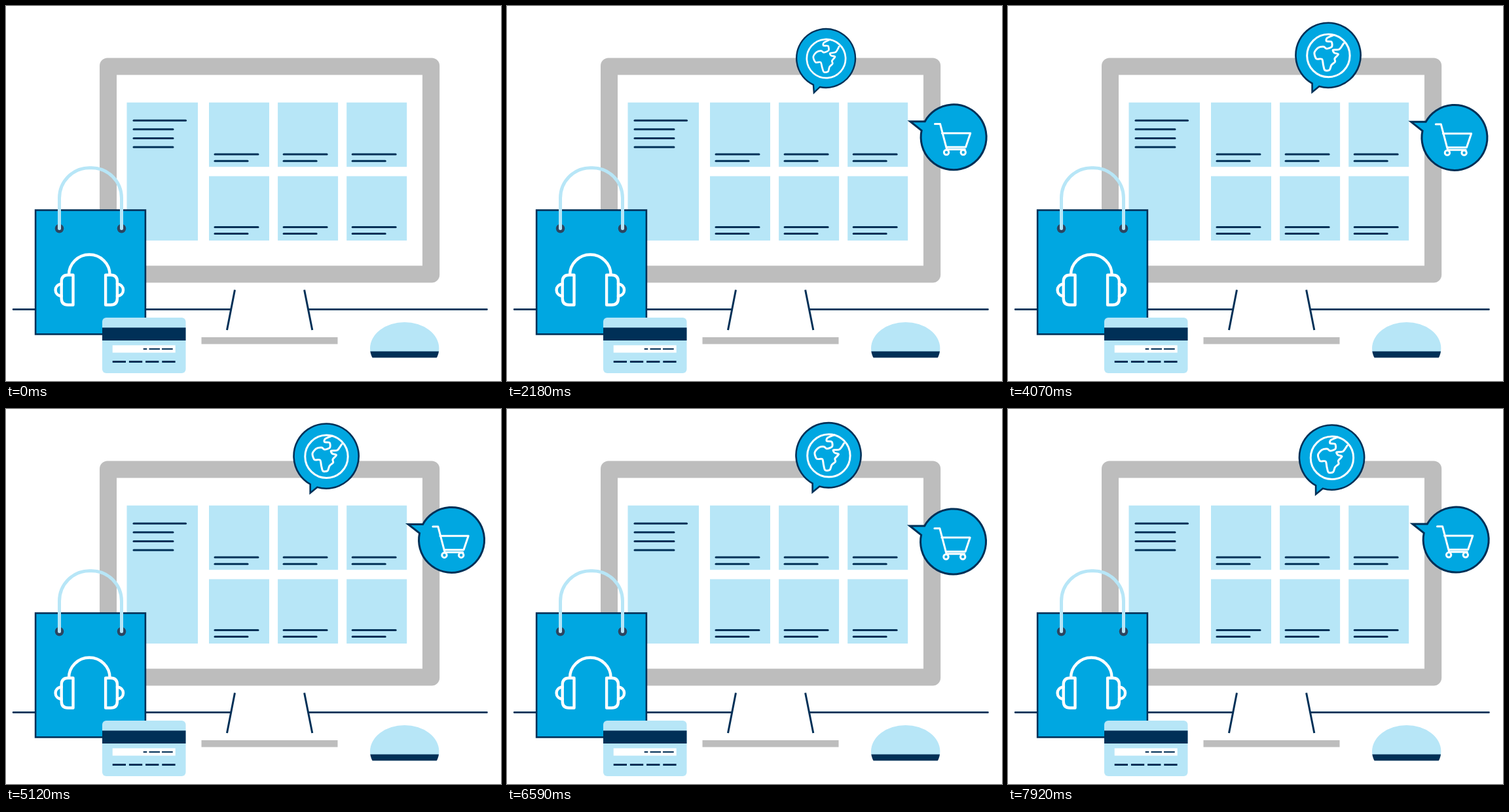
An HTML page for the animation above (7990 ms loop, 756 by 574 pixels).

```html
<!DOCTYPE html>
<html lang="en">
<head>
<meta charset="utf-8">
<title>Online shopping</title>
<style>
  html, body { margin: 0; width: 100%; height: 100%; overflow: hidden; background: #fff; }
  svg { display: block; width: 100%; height: 100%; }
  .gray { fill: #bdbdbd; }
  .light { fill: #b7e6f7; }
  .navy { fill: #003057; }
  .white { fill: #fff; }
  .blue { fill: #00a7e1; stroke: #003057; stroke-width: 2.6; }
  .ink { fill: none; stroke: #003057; stroke-width: 3; }
  .icon { fill: none; stroke: #fff; stroke-width: 3; stroke-linecap: round; stroke-linejoin: round; }
  .round { stroke-linecap: round; }
  .thin { stroke-width: 2.6; }
  .bold { stroke-width: 4.4; }
</style>
</head>
<body>
<svg viewBox="0 0 756 574">
  <defs>
    <clipPath id="dome"><ellipse cx="608.7" cy="524" rx="52.7" ry="40"/></clipPath>
    <g id="cup">
      <path d="M102.5 411.7H94.5Q84.7 411.7 84.7 422V447.5Q84.7 457.5 94.5 457.5H102.5Z"/>
      <path d="M84.7 425.5C72.5 427 72.5 442.5 84.7 444"/>
    </g>
  </defs>

  <!-- desk and monitor -->
  <path class="ink round thin" d="M11 464.4H343M462.5 464.4H734.5"/>
  <rect class="gray" x="143" y="79.5" width="519.2" height="344" rx="12"/>
  <rect class="white" x="169" y="105.5" width="467" height="292"/>
  <rect class="light" x="184.5" y="147.7" width="108.5" height="211.3"/>
  <g id="page"></g>
  <path class="ink" d="M349.5 434.5L337.5 496M455.6 434.5L467.8 496"/>
  <rect class="gray" x="298.5" y="507" width="208" height="10.5"/>

  <!-- mouse -->
  <g clip-path="url(#dome)">
    <rect class="light" x="550" y="480" width="118" height="50"/>
    <rect class="navy" x="550" y="528.6" width="118" height="9.7"/>
  </g>

  <!-- bag -->
  <rect class="blue" x="45.1" y="312.5" width="167.8" height="189.9"/>
  <g fill="#2c4560">
    <circle cx="81.5" cy="340.6" r="6.8"/>
    <circle cx="176.5" cy="340.6" r="6.8"/>
  </g>
  <path class="round" fill="none" stroke="#b7e6f7" stroke-width="5"
    d="M81.5 340.5V294A46 46.3 0 0 1 127.5 247.7H130.5A46 46.3 0 0 1 176.5 294V340.5"/>
  <g class="icon bold">
    <path d="M96 411.5A31.3 31 0 0 1 158.6 411.5"/>
    <use href="#cup"/>
    <use href="#cup" transform="translate(254.6 0) scale(-1 1)"/>
  </g>

  <!-- payment card -->
  <rect class="light" x="147" y="477" width="127.5" height="85" rx="6"/>
  <rect class="navy" x="147" y="492.3" width="127.5" height="19.7"/>
  <rect class="white" x="162.7" y="519.3" width="96" height="11.3"/>
  <path class="ink" style="stroke-width:2" d="M209.7 525H215.3M218.5 525H235M238 525H254.7"/>
  <path class="ink" d="M162.7 544.5H258.7" stroke-dasharray="20.3 4.9"/>

  <!-- speech bubbles, each centred on 0,0 -->
  <g id="globe">
    <path class="blue" d="M-24.4 43.2A49.6 49.6 0 1 1 -13.7 47.7L-24.4 56.5Z"/>
    <g class="icon">
      <circle cx=".4" cy=".7" r="32.7"/>
      <path id="land"/>
    </g>
  </g>
  <g id="cart">
    <path class="blue" style="stroke-width:3" d="M-43.5-25.6A50 50 0 1 1 -48.6-11.8L-66-25.6Z"/>
    <g class="icon">
      <path d="M-28.3-21.9H-20.3L-11 13.6H18.8L26-7.7H-17.3M-11 13.6L-10 17.2H17.5"/>
      <circle cx="-10.7" cy="21.7" r="3.7"/>
      <circle cx="15" cy="21.7" r="3.7"/>
    </g>
  </g>
</svg>
<script>
const LOOP = 7990, STEP = 70, FIRST = 1060, POP = 950;
const $ = id => document.getElementById(id);

// web page on the screen
const line = (x, y, w) => `<path class="ink round" d="M${x} ${y}h${w}"/>`;
let page = "";
for (let i = 0; i < 4; i++) page += line(195, 175.3 + 13.57 * i, i ? 60 : 79.5);
for (let row = 0; row < 2; row++) {
  for (let col = 0; col < 3; col++) {
    const x = 310 + 105.1 * col, y = 227.1 + 111.3 * row;
    page += `<rect class="light" x="${x}" y="${147.7 + 112.8 * row}" width="92" height="98.5"/>`
      + line(x + 9, y, 66) + line(x + 9, y + 10.2, 50);
  }
}
$("page").innerHTML = page;

// coastline: a soft curve through a few points
function curve(points) {
  const at = i => points[Math.min(points.length - 1, Math.max(0, i))];
  const lean = (i, sign) => at(i).map((v, k) => v + sign * (at(i + 1)[k] - at(i - 1)[k]) / 7);
  return points.map((p, i) => i ? `C${lean(i - 1, 1)} ${lean(i, -1)} ${p}` : `M${p}`).join("");
}
$("land").setAttribute("d", curve([
  [9, -31], [-1.5, -26.5], [-2.5, -21.5], [5, -20.5], [5.5, -13], [-2.5, -10], [-7, -13],
  [-15, -11.5], [-21, -4], [-18, 5.5], [-9.5, 6], [-7.5, 15], [-5, 23], [2, 22.5], [5, 15],
  [10.5, 10], [10, 5], [15.5, -1.5], [9.5, -3.5], [7.5, -8], [17, -9], [23.5, -18]
]));

const clamp = v => Math.min(1, Math.max(0, v));
const smooth = v => v * v * (3 - 2 * v);
const wave = (t, peak, period) => Math.cos(2 * Math.PI * (t - peak) / period);

// each bubble pops out from a point back by "from", then drifts
const bubbles = [
  { node: $("globe"), start: 1410, turn: -45, from: [47, -31],
    drift: t => [488.9 + 0.48 * ((t - 4500) / 1000) ** 2, 74 + 3.55 * wave(t, 2765, 6860)] },
  { node: $("cart"), start: 1000, turn: -30, from: [22, 15],
    drift: t => {
      const c = wave(t, 3100, 4600);
      return [681.1 + 1.9 * c + c * c, 203.2 + 1.6 * wave(t, 3230, 3080)];
    } }
];

function draw(t) {
  for (const { node, start, turn, from, drift } of bubbles) {
    const s = smooth(clamp((t - start) / POP)), rest = 1 - s;
    node.style.display = t >= FIRST && s > 0 ? "" : "none";
    const [x, y] = drift(t);
    node.setAttribute("transform",
      `translate(${x - from[0] * rest} ${y - from[1] * rest}) rotate(${turn * rest}) scale(${s})`);
  }
}

const begin = performance.now();
function tick() {
  const t = (performance.now() - begin) % LOOP;
  draw(t < FIRST ? 0 : FIRST + Math.floor((t - FIRST) / STEP) * STEP);
  requestAnimationFrame(tick);
}
draw(0);
requestAnimationFrame(tick);
</script>
</body>
</html>
```
